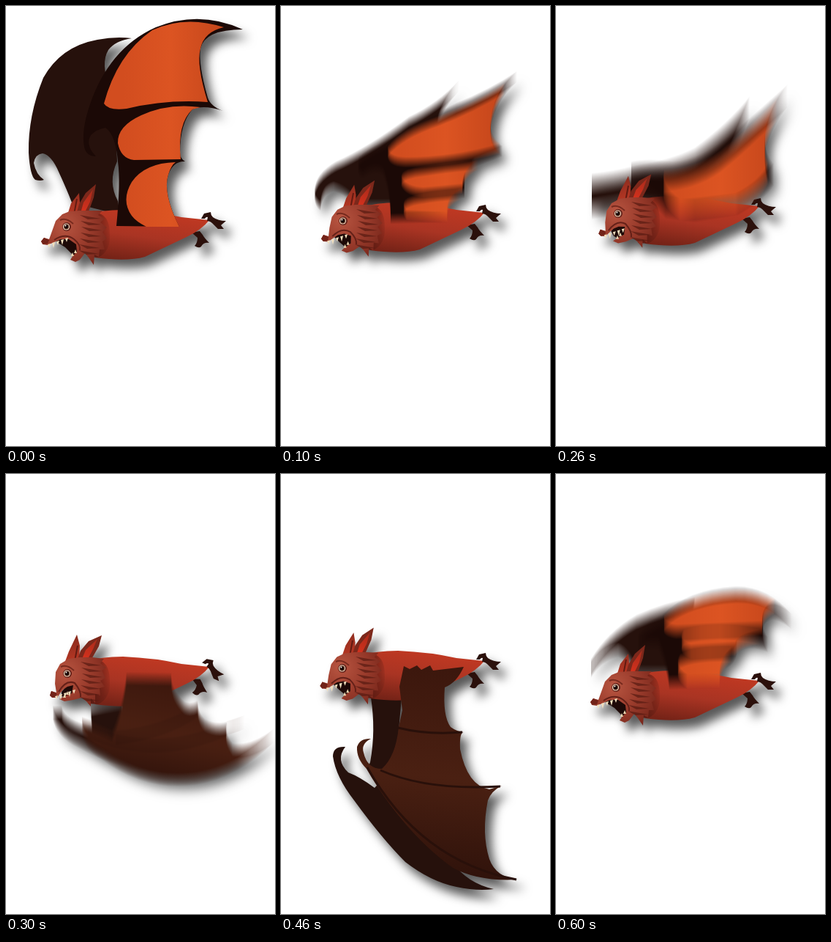
An HTML page with a canvas for the animation above (0.7 s loop, 368 by 600 pixels).

```html
<!DOCTYPE html>
<html lang="en">
<head>
<meta charset="utf-8">
<title>Flying bat</title>
<style>
html, body { margin: 0; width: 100%; height: 100%; overflow: hidden; background: #fff; }
canvas { display: block; width: 368px; height: 600px; }
</style>
</head>
<body>
<canvas id="stage" width="368" height="600"></canvas>
<script>
const W = 368, H = 600, STEP = 100;
const ORANGE = ['#d24d1f', '#dc5422', '#c8481c'];
const BROWN = ['#3c170d', '#4a2012', '#2d110a'];

// eye: head position, open: jaw 0..1, dy: body lift, smear: vertical motion blur
const poses = [
  {
    eye: [83, 301], open: 1, dy: 0, smear: 0,
    far: 'M172 44Q150 41 125 46Q75 55 51 98Q30 150 31 200Q33 232 40 237Q47 239 52 237Q41 230 38 214Q40 202 50 201Q62 203 72 226Q84 252 90 268L156 285L153 266Q139 240 152 212L150 165L142 112Q129 78 140 60Q150 47 172 44Z',
    near: 'M324 32Q265 5 205 29Q140 58 114 137Q103 170 107 192Q110 205 123 205Q108 190 116 176Q124 168 136 166Q150 175 153 212Q157 240 151 300L237 301Q214 255 222 230Q229 211 245 212Q238 208 238 200Q238 160 255 141Q270 134 297 143Q280 137 276 125Q263 80 266 58Q272 32 324 32Z',
    skin: [
      'M298 29Q245 12 200 33Q152 66 134 133Q140 143 165 140Q220 127 276 131Q260 80 266 58Q271 35 298 29Z',
      'M266 138Q222 132 185 149Q152 164 153 187Q157 208 175 210L239 209Q234 160 255 141Z',
      'M232 213Q190 214 172 240Q157 265 172 286Q178 294 192 301L237 301Q214 255 222 230Q226 217 232 213Z'
    ]
  },
  {
    eye: [85, 293], open: .55, dy: -10, smear: 14,
    far: 'M244 108Q215 139 175 158Q120 199 75 219Q47 235 46 257Q47 268 54 272Q56 250 72 246Q90 250 105 270L200 270L215 155Q222 133 244 108Z',
    near: 'M323 96Q285 121 240 139Q190 164 160 185Q125 196 107 212Q103 225 112 228Q130 215 140 225Q150 250 150 290L228 288Q224 272 232 263Q240 255 251 255Q248 225 265 213L303 198Q284 185 287 160Q292 125 323 96Z',
    skin: [
      'M306 112Q265 138 215 157Q165 174 146 198Q146 212 170 213Q235 213 300 194Q284 185 287 160Q290 135 306 112Z',
      'M270 216Q230 220 190 226Q162 230 165 240Q172 253 195 254L248 249Q248 228 270 216Z',
      'M246 257Q205 260 182 265Q160 271 172 285L228 288Q224 266 246 257Z'
    ]
  },
  {
    eye: [85, 283], open: .25, dy: -19, smear: 30,
    far: 'M265 138Q235 175 190 208Q160 224 110 232Q80 240 49 243L49 276L100 268L170 272L235 210Q250 175 265 138Z',
    near: 'M317 122Q285 150 245 185Q200 225 160 227Q125 222 103 227L103 252Q130 250 150 275L190 280L250 270Q285 250 298 230Q284 215 286 185Q295 150 317 122Z',
    skin: ['M303 140Q265 180 225 212Q190 236 148 238Q142 258 170 278L245 270Q280 252 290 228Q284 212 286 185Q291 160 303 140Z']
  },
  {
    eye: [84, 272], open: 0, dy: -29, smear: 18, down: true, top: 275, end: 420,
    far: 'M64 325Q68 350 100 365Q150 395 230 400L160 365L158 314L116 322L118 352Q80 345 76 325Z',
    near: 'M165 279Q158 330 145 357Q120 345 104 340Q104 365 130 380Q190 425 260 415Q320 405 367 356Q335 380 310 376Q298 360 302 346L327 338Q295 355 272 343Q263 335 262 318Q248 325 240 315Q226 300 226 280Z',
    ribs: 'M150 360Q220 352 262 322M112 350Q200 392 302 348'
  },
  {
    eye: [84, 265], open: .6, dy: -37, smear: 0, down: true, top: 265, end: 555,
    far: 'M88 372Q71 371 71 385Q75 413 100 445Q138 497 170 529Q205 556 240 563Q268 569 291 566Q255 558 235 530L130 410Q117 402 122 393Q130 350 123 305L165 305L160 360L150 405L128 428Q108 413 92 407Q74 390 88 372Z',
    near: 'M166 322L162 290L168 262L176 266L186 261L192 267L204 261L208 268L250 263Q240 285 224 291Q221 330 232 345Q240 351 250 352Q244 352 245 375Q255 425 285 430L302 425Q288 432 283 445Q274 490 285 525Q294 550 324 553Q270 556 235 537Q190 505 150 452Q130 425 117 402Q103 388 104 372Q108 360 123 361Q109 368 113 380Q118 402 138 402Q157 385 161 345Z',
    ribs: 'M160 346Q200 356 248 352M136 404Q200 432 300 426M118 400Q190 528 322 553'
  },
  {
    eye: [83, 280], open: 1, dy: -22, smear: 30, down: true, top: 275, end: 470,
    far: 'M84 365Q66 388 66 408Q72 430 125 424Q180 430 222 455Q270 480 302 515L282 445L200 400L122 400L118 332L156 332L152 380Q120 400 95 398Q76 398 84 365Z',
    near: 'M158 278L150 350Q140 388 112 390Q102 382 110 355Q97 385 103 408Q160 414 222 436Q290 455 338 497Q318 450 306 395Q296 368 285 352Q262 322 250 316Q228 305 222 282Z',
    ribs: 'M150 355Q220 330 285 352M110 396Q200 390 304 390'
  },
  {
    eye: [82, 291], open: 1, dy: -10, smear: 20,
    far: 'M48 262Q70 225 110 202Q150 184 190 178L170 270L110 270Q100 245 85 240Q62 245 48 268Z',
    near: 'M323 202Q290 162 245 163Q180 167 145 202Q115 215 112 232Q125 228 140 230Q150 250 155 284L224 282Q222 262 233 255Q245 250 248 235Q260 222 290 233Q278 215 285 196Q295 180 323 202Z',
    skin: [
      'M300 180Q270 162 230 168Q175 174 148 202Q145 212 165 215L282 210Q280 190 300 180Z',
      'M280 222Q220 210 175 222Q165 235 185 242L245 238Q255 225 280 222Z',
      'M240 246Q190 245 170 255Q160 270 180 283L224 282Q222 262 240 246Z'
    ]
  }
];

// Head parts around the eye, as [jaw open, jaw closed]
const head = [
  '32 -22 49 -22 43 -16 52 -11 46 -6 55 1 49 7 55 16 49 20 52 31 45 31 44 41 38 38 37 52 30 42 25 36 18 45 12 48 5 45 9 39 14 34 13 24 3 17 -8 17 -17 21 -26 25 -33 24 -35 20 -31 15 -24 17 -20 6 -15 -8 -6 -17 4 -21 18 -22',
  '34 -22 50 -20 45 -14 53 -8 47 -4 52 6 45 10 51 18 44 20 45 30 38 28 38 40 32 34 32 45 26 38 20 33 8 36 -4 38 -11 35 -4 31 6 27 8 16 0 18 -6 22 -10 27 -14 33 -20 33 -24 30 -22 24 -15 26 -17 14 -16 -2 -10 -13 2 -20 16 -22'
];
const mouth = ['-15 20 -8 15 3 15 13 22 18 34 11 41 -2 28', '-8 25 0 16 8 14 13 22 8 30 -2 33 -8 31'];
const earL = ['1 -16 6 -32 17 -46 18 -33 16 -14', '-4 -14 2 -30 13 -53 17 -38 16 -16'];
const earR = ['12 -13 17 -31 26 -46 40 -58 37 -40 29 -18', '12 -14 18 -31 29 -44 47 -52 43 -37 32 -18'];
const earIn = ['18 -15 23 -33 36 -51 32 -34 24 -18', '18 -15 25 -32 41 -47 35 -33 27 -18'];
const nose = ['-35 20 -31 15 -24 18 -26 23 -32 24', '-24 30 -22 24 -15 27 -15 32 -21 33'];

function layer() {
  const c = document.createElement('canvas');
  c.width = W;
  c.height = H;
  return c.getContext('2d');
}

function fill(g, path, paint) {
  g.fillStyle = paint;
  g.fill(new Path2D(path));
}

function stroke(g, path, color, width) {
  g.strokeStyle = color;
  g.lineWidth = width;
  g.stroke(new Path2D(path));
}

function dot(g, x, y, r, color) {
  g.fillStyle = color;
  g.beginPath();
  g.arc(x, y, r, 0, 7);
  g.fill();
}

function ramp(g, x0, y0, x1, y1, colors) {
  const r = g.createLinearGradient(x0, y0, x1, y1);
  colors.forEach((c, i) => r.addColorStop(i / (colors.length - 1), c));
  return r;
}

function blend([a, b], open) {
  const p = a.split(' '), q = b.split(' ');
  return 'M' + p.map((v, i) => v * open + q[i] * (1 - open)).join(' ') + 'Z';
}

// Vertical box blur, weighted by alpha
function blurDown(g, length) {
  const img = g.getImageData(0, 0, W, H), px = img.data, src = px.slice();
  const half = length >> 1, size = 2 * half + 1;
  for (let x = 0; x < W; x++) {
    const sum = [0, 0, 0, 0];
    const add = (y, sign) => {
      if (y < 0 || y >= H) return;
      const i = (y * W + x) * 4, a = src[i + 3] * sign;
      for (let c = 0; c < 3; c++) sum[c] += src[i + c] * a;
      sum[3] += a;
    };
    for (let y = -half; y < H; y++) {
      add(y + half, 1);
      add(y - half - 1, -1);
      if (y < 0) continue;
      const i = (y * W + x) * 4;
      for (let c = 0; c < 3; c++) px[i + c] = sum[3] ? sum[c] / sum[3] : 0;
      px[i + 3] = sum[3] / size;
    }
  }
  g.putImageData(img, 0, 0);
}

function smear(g, length, draw) {
  const wing = layer();
  draw(wing);
  if (length) blurDown(wing, length);
  g.drawImage(wing.canvas, 0, 0);
}

function drawNear(g, p) {
  if (p.down) {
    fill(g, p.near, ramp(g, 200, p.top, 170, p.end, BROWN));
    stroke(g, p.ribs, '#29100a', 3);
    return;
  }
  fill(g, p.near, '#1b0906');
  p.skin.forEach(s => fill(g, s, ramp(g, 160, 0, 290, 0, ORANGE)));
}

function drawFoot(g, x, y, turn, path) {
  g.save();
  g.translate(x, y);
  g.rotate(turn);
  fill(g, path, '#2b100b');
  g.restore();
}

function drawBody(g, p) {
  const turn = p.open ? 0 : .4;
  g.save();
  g.translate(0, p.dy);
  drawFoot(g, 257, 311, turn / 2, 'M-3 -2L5 5Q5 12 1 16Q7 20 10 17Q13 11 21 12Q14 5 12 1L8 -4Z');
  fill(g, 'M108 285Q130 278 160 278Q205 280 240 288L278 292Q268 305 247 315L190 342Q165 349 122 343Z',
    ramp(g, 180, 279, 170, 347, ['#be3822', '#a93423', '#762317']));
  fill(g, 'M115 283Q142 278 142 312Q143 335 126 343L112 342Z',
    ramp(g, 120, 0, 146, 0, ['#5e1c13', '#5e1c1300']));
  drawFoot(g, 277, 291, turn, 'M-2 2Q3 2 8 8L13 13L21 13L17 8L24 2Q13 2 6 -3Q3 -6 3 -10L-6 -8L-10 -1L-5 -1Q-3 -4 -1 -3Z');
  g.restore();
}

function drawHead(g, { eye, open }) {
  const shut = 1 - open;
  g.save();
  g.translate(...eye);
  fill(g, blend(earL, open), ramp(g, 0, -45, 12, -15, ['#8b2c1e', '#bd3824']));
  stroke(g, 'M10 -17L14 -38', '#611b12', 2);
  fill(g, blend(earR, open), '#7c281b');
  fill(g, blend(earIn, open), ramp(g, 34, -50, 20, -15, ['#a82b1b', '#dc321d']));
  fill(g, blend(mouth, open), '#1d0907');
  const skin = g.createRadialGradient(-4, -2, 3, 2, 2, 58);
  skin.addColorStop(0, '#b5533f');
  skin.addColorStop(.5, '#9c3d2d');
  skin.addColorStop(1, '#7a281c');
  fill(g, blend(head, open), skin);
  for (let i = 0; i < 7; i++) {
    const y = -15 + i * 8, x = 32 - Math.abs(i - 2);
    fill(g, `M${x - 12} ${y - 1}L${x + 16} ${y + 4}L${x - 1} ${y + 5}Z`, '#561a12b0');
  }
  stroke(g, `M${-17 + 5 * shut} ${18 + 7 * shut}Q-2 8 10 ${17 - 4 * shut}Q19 24 18 32`, '#642018', 2);
  stroke(g, 'M-9 -9Q-1 -13 9 -4', '#762a1e', 2);
  fill(g, blend(nose, open), '#722319');
  for (let i = 0; i < 5; i++) {
    const x = -24 + i * 6 + 9 * shut, y = 24 - i * 2 + 7 * shut;
    fill(g, `M${x - 2} ${y}L${x + 2} ${y - 1}L${x} ${y + 5 + i % 2 * 2}Z`, '#f1dfbd');
  }
  for (let i = 0; i < 2; i++) {
    const x = 8 + i * 4 - 12 * shut, y = 40 - i * 4 - 7 * shut;
    fill(g, `M${x - 2} ${y}L${x + 2} ${y}L${x} ${y - 5}Z`, '#ecd6b0');
  }
  dot(g, 0, 0, 6, '#64221a');
  dot(g, -.5, 0, 4.6, '#f0dcc2');
  dot(g, -.5, 0, 3.4, '#4a2114');
  dot(g, -.5, 0, 2.2, '#100504');
  dot(g, -1.6, -1.4, 1, '#fff');
  g.restore();
}

function render(p) {
  const bat = layer(), out = layer();
  smear(bat, p.smear, g => fill(g, p.far, '#26110c'));
  drawBody(bat, p);
  smear(bat, p.smear, g => drawNear(g, p));
  drawHead(bat, p);
  out.fillStyle = '#fff';
  out.fillRect(0, 0, W, H);
  out.shadowColor = 'rgba(0,0,0,.65)';
  out.shadowBlur = 14;
  out.shadowOffsetX = 9;
  out.shadowOffsetY = 12;
  out.drawImage(bat.canvas, 0, 0);
  return out.canvas;
}

const stage = document.getElementById('stage').getContext('2d');
const shots = poses.map(render);
const start = performance.now();

function tick() {
  const t = Math.max(0, performance.now() - start);
  stage.drawImage(shots[Math.floor(t / STEP) % shots.length], 0, 0);
  requestAnimationFrame(tick);
}
tick();
</script>
</body>
</html>
```
